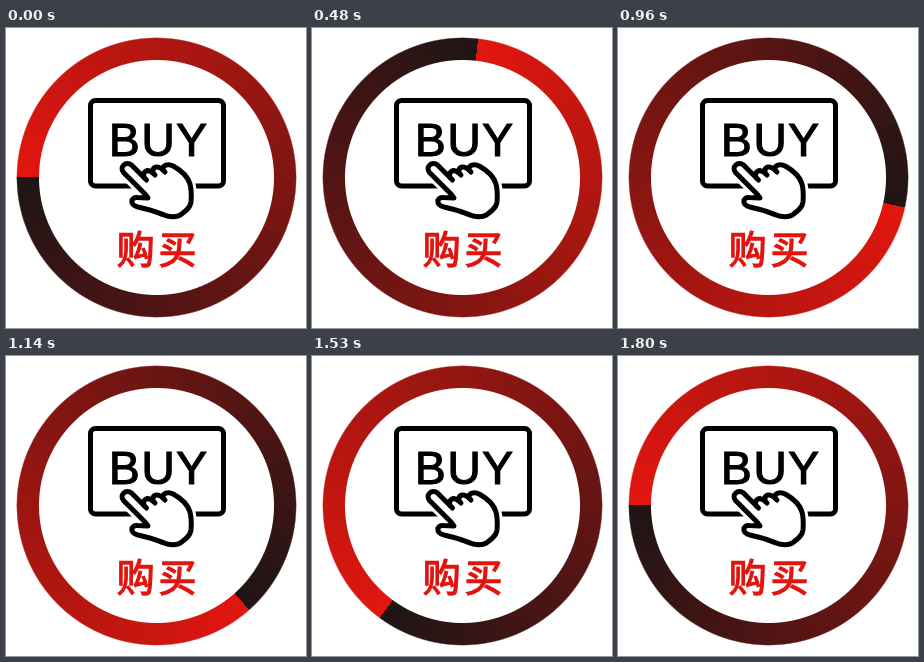
An HTML page for the animation above (1830 ms loop, 300 by 300 pixels).

```html
<!DOCTYPE html>
<html lang="zh-CN">
<head>
<meta charset="utf-8">
<title>购买</title>
<style>
  html, body { margin: 0; width: 100%; height: 100%; overflow: hidden; background: #fff; }
  #ring {
    position: absolute; left: 10px; top: 9px; width: 281px; height: 281px; border-radius: 50%;
    --mask: radial-gradient(circle closest-side, #0000 117px, #000 118px, #000 139px, #0000 140.5px);
    -webkit-mask: var(--mask); mask: var(--mask);
  }
  svg { position: absolute; left: 0; top: 0; }
  .line { fill: #fff; stroke: #000; stroke-width: 5; stroke-linejoin: round; stroke-linecap: round; }
  .halo { fill: #fff; stroke: #fff; stroke-width: 11; stroke-linejoin: round; }
  .buy {
    font: 46px "Liberation Sans", Arial, sans-serif; letter-spacing: 1.7px;
    stroke: #000; stroke-width: 1.2;
  }
  .label {
    font: 38px "Noto Sans CJK SC", "Noto Sans CJK", sans-serif; letter-spacing: 3.6px;
    fill: #e2140f; stroke: #e2140f; stroke-width: 1.3;
  }
</style>
</head>
<body>
<div id="ring"></div>
<svg width="300" height="300">
  <defs>
    <path id="hand" d="M139 166 L117.5 144.5 C113 139 120 132.5 125.5 137 L138 149.5
      C136 144 141 140 147 145 C146 139 151 136.5 157 142 C156 137 162 135 168 138.5
      C176 143 182 149 184 156 C185.5 162 185.5 168 185 174 C184.5 178 183 180 180 182.5
      L175 186.5 C171 189.5 166 189 161 188 C152 185 147 182.5 142 181.5 L132 179
      C123 176.5 125 169 131 169.5 L142 170 Z"/>
  </defs>
  <rect class="line" x="84.5" y="72.5" width="133" height="85.5" rx="5"/>
  <text class="buy" x="103" y="128.3">BUY</text>
  <use href="#hand" class="halo"/>
  <use href="#hand" class="line"/>
  <path class="line" d="M138 149.5 l2.5 2.5 M147 145 l2 2 M157 142 l2 2"/>
  <text class="label" x="110.8" y="234.5">购买</text>
</svg>
<script>
  const ring = document.getElementById("ring");
  const LOOP = 1830, STEP = 30, TURN = 6, START = 270.4;

  function draw(now) {
    const angle = START + Math.floor(now % LOOP / STEP) * TURN;
    ring.style.background = `conic-gradient(from ${angle}deg, #e2160f, #1e1515)`;
    requestAnimationFrame(draw);
  }
  draw(performance.now());
</script>
</body>
</html>
```
